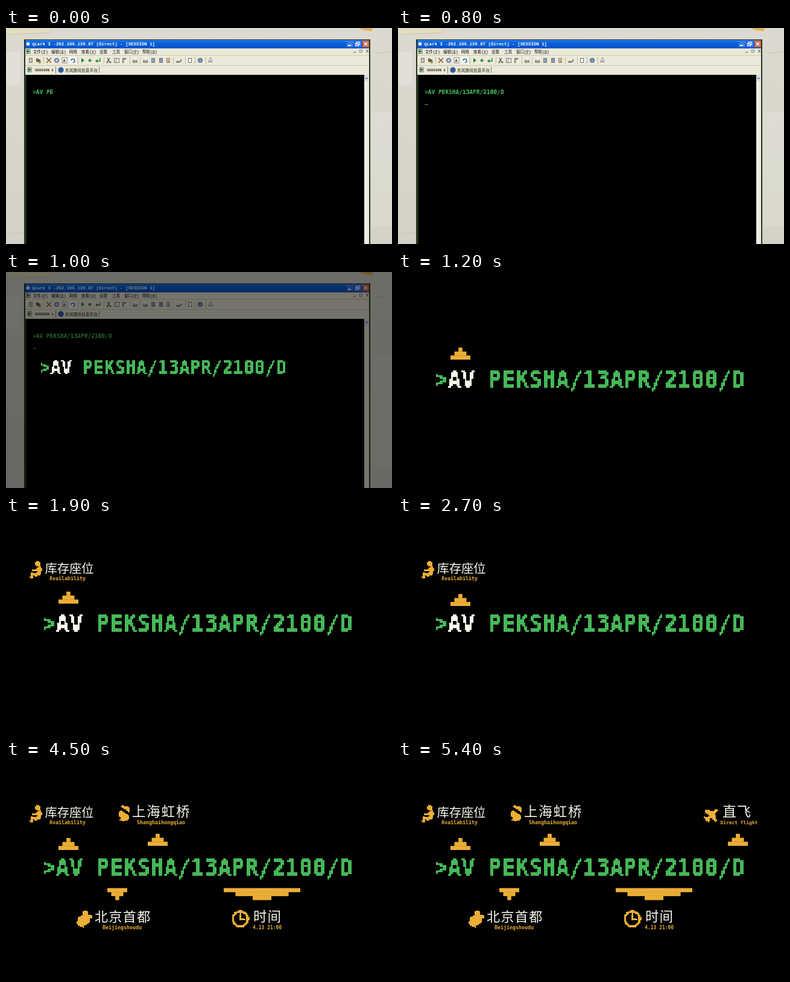
An HTML page with a canvas for the animation above (5500 ms loop, 640 by 360 pixels).

```html
<!DOCTYPE html>
<html lang="zh">
<head>
<meta charset="utf-8">
<title>AV command</title>
<style>
html, body { margin: 0; width: 100%; height: 100%; overflow: hidden; background: #000; }
canvas { display: block; width: 100vw; height: 100vh; }
</style>
</head>
<body>
<canvas id="stage" width="640" height="360"></canvas>
<script>
const ctx = document.getElementById('stage').getContext('2d');
const LOOP = 5500, STEP = 100;
const GREEN = '#46b858', WHITE = '#f8f6ea', ORANGE = '#ebae36', CREAM = '#ece9d8';
const CJK = '"Noto Sans CJK SC", "Noto Sans CJK", sans-serif';
const MONO = '"DejaVu Sans Mono", monospace';
const THIN = '"Liberation Mono", "Noto Sans CJK SC", monospace';
const COMMAND = '>AV PEKSHA/13APR/2100/D';

const clamp = v => Math.max(0, Math.min(1, v));
const mix = (a, b, p) => a + (b - a) * p;

function rect(x, y, w, h, color, c = ctx) {
  c.fillStyle = color;
  c.fillRect(x, y, w, h);
}
function dot(x, y, r, color, c = ctx) {
  c.fillStyle = color;
  c.beginPath();
  c.arc(x, y, r, 0, Math.PI * 2);
  c.fill();
}
function path(points, c = ctx) {
  c.beginPath();
  points.forEach(([x, y]) => c.lineTo(x, y));
}
function shape(points, color, c = ctx) {
  path(points, c);
  c.fillStyle = color;
  c.fill();
}
function line(points, color, width = 1, c = ctx) {
  path(points, c);
  c.strokeStyle = color;
  c.lineWidth = width;
  c.stroke();
}
function text(str, x, y, font, color, spacing = 0) {
  ctx.font = font;
  ctx.fillStyle = color;
  ctx.letterSpacing = spacing + 'px';
  ctx.fillText(str, x, y);
  ctx.letterSpacing = '0px';
}

// Paints on a coarse grid and makes every cell fully on or off.
function pixelate(w, h, paint) {
  const tile = document.createElement('canvas');
  tile.width = w;
  tile.height = h;
  const c = tile.getContext('2d');
  paint(c);
  const image = c.getImageData(0, 0, w, h), d = image.data;
  for (let i = 3; i < d.length; i += 4) d[i] = d[i] > 115 ? 255 : 0;
  c.putImageData(image, 0, 0);
  return tile;
}
function pixelText(str, color) {
  return pixelate(str.length * 8, 16, c => {
    c.font = 'bold 13.3px ' + MONO;
    c.fillStyle = color;
    [...str].forEach((ch, i) => c.fillText(ch, i * 8, 12));
  });
}
function icon(x, y, w, h, paint) {
  const cell = 1.7, cols = Math.ceil(w / cell), rows = Math.ceil(h / cell);
  const tile = pixelate(cols, rows, c => {
    c.scale(1 / cell, 1 / cell);
    paint(c);
  });
  return { tile, x, y, w: cols * cell, h: rows * cell };
}

const greenText = pixelText(COMMAND, GREEN);
const whiteAV = pixelText(' AV', WHITE);

const seat = icon(38, 75, 23, 31, c => {
  dot(15, 4.5, 4.3, ORANGE, c);
  shape([[13, 10], [20, 9], [22, 14], [19, 24], [9, 25], [9, 21], [14, 19]], ORANGE, c);
  line([[15, 11], [12, 16], [5, 16]], ORANGE, 3, c);
  line([[12, 23], [5, 21], [5, 27], [1, 28]], ORANGE, 4, c);
});
const beijing = icon(117, 249, 28, 31, c => shape([
  [13, 1], [18, 3], [18, 8], [26, 10], [26, 14], [21, 17], [23, 22], [15, 25],
  [11, 30], [2, 27], [0, 22], [3, 19], [1, 15], [7, 11], [10, 10], [10, 5]], ORANGE, c));
const shanghai = icon(185, 75, 22, 29, c => {
  shape([[1, 14], [6, 9], [10, 12], [18, 17], [19, 24], [13, 26], [9, 28], [4, 25], [5, 20], [1, 19]], ORANGE, c);
  line([[6, 1], [12, 4], [20, 11]], ORANGE, 4, c);
  line([[14, 2], [20, 7]], ORANGE, 2, c);
});
const clock = icon(373, 250, 31, 31, c => {
  c.strokeStyle = ORANGE;
  c.lineWidth = 3.8;
  c.beginPath();
  c.arc(15.5, 15, 12.6, 0, Math.PI * 2);
  c.stroke();
  line([[15.5, 6], [15.5, 16], [23, 16]], ORANGE, 3.2, c);
});
const plane = icon(507, 80, 24, 25, c => {
  line([[4, 21], [22, 3]], ORANGE, 5, c);
  shape([[1, 5], [4, 3], [17, 6], [10, 14]], ORANGE, c);
  shape([[20, 24], [22, 21], [18, 8], [11, 15]], ORANGE, c);
  shape([[0, 14], [10, 16], [9, 24], [7, 24], [5, 19], [0, 17]], ORANGE, c);
});

const labels = [
  { at: 1200, wait: 200, arrow: [103.5, 130, 1], icon: seat,
    title: ['库存座位', 64.5, 95, 20.5, -.3], note: ['Availability', 72, 107] },
  { at: 3300, wait: 100, arrow: [184.5, 213.5, -1], icon: beijing,
    title: ['北京首都', 147, 269, 22, 1.4], note: ['Beijingshoudu', 160, 281.5] },
  { at: 3900, wait: 100, arrow: [251.5, 123, 1], icon: shanghai,
    title: ['上海虹桥', 209, 94, 22.5, 1.8], note: ['Shanghaihongqiao', 217, 107] },
  { at: 4300, wait: 100, arrow: [424.5, 213.5, -1, [63.5, 44, 15.5]], icon: clock,
    title: ['时间', 410, 269, 22.5, 1], note: ['4.13 21:00', 409, 281.5, 8] },
  { at: 4700, wait: 100, arrow: [563.5, 123, 1], icon: plane,
    title: ['直飞', 538, 94, 23, 1], note: ['Direct flight', 534.5, 107, 7.9] }
];

function drawArrow([cx, y, up, halves = [16.5, 10, 3.3]], lift) {
  halves.forEach((half, i) => {
    const row = up > 0 ? 2 - i : i;
    rect(cx - half, y + lift + row * 6.6, half * 2, 6.8, ORANGE);
  });
}

function drawLabel(label, t) {
  if (t < label.at) return;
  const bobbing = label === labels[0] && t < 2700;
  const lift = bobbing && Math.floor((t - label.at) / 300) % 2 === 0 ? -4 : 0;
  drawArrow(label.arrow, lift);
  ctx.globalAlpha = clamp((t - label.at - label.wait + 100) / 200);
  const { tile, x, y, w, h } = label.icon;
  ctx.imageSmoothingEnabled = false;
  ctx.drawImage(tile, x, y, w, h);
  const [title, tx, ty, size, gap] = label.title;
  text(title, tx, ty, `500 ${size}px ${CJK}`, WHITE, gap);
  const [note, nx, ny, noteSize = 8.3] = label.note;
  text(note, nx, ny, `bold ${noteSize}px ${MONO}`, ORANGE);
  ctx.globalAlpha = 1;
}

function drawCommand(x, baseline, scale, count, highlight) {
  const sy = scale * 1.04;
  const put = (tile, w) => ctx.drawImage(tile, 0, 0, w, 16, x, baseline - 12 * sy, w * scale, 16 * sy);
  ctx.imageSmoothingEnabled = scale < 1;
  put(greenText, count * 8);
  if (highlight) {
    rect(x + 8 * scale, baseline - 12 * sy, 16 * scale, 16 * sy, '#000');
    put(whiteAV, 24);
  }
}

function drawWall() {
  const wall = ctx.createLinearGradient(0, 0, 0, 360);
  wall.addColorStop(0, '#dcdad0');
  wall.addColorStop(1, '#d3d2c6');
  rect(0, 0, 640, 360, wall);
  shape([[0, 0], [75, 0], [73, 8], [0, 11]], '#e3dcc0');
  line([[0, 11], [73, 8], [75, 0]], '#c9c4ae');
  rect(0, 40, 24, 55, 'rgba(255,255,250,.16)');
  rect(606, 140, 34, 190, 'rgba(255,255,250,.13)');
  line([[0, 343], [28, 341]], '#c6c5b9');
  line([[614, 42], [640, 40]], '#c8c7bb');
  shape([[586, 0], [609, 0], [606, 6], [590, 3]], '#e0b761');
}

function drawTitleBar() {
  rect(30, 19, 574, 341, '#26321a');
  const blue = ctx.createLinearGradient(0, 20, 0, 34);
  blue.addColorStop(0, '#2484f2');
  blue.addColorStop(.3, '#0961dc');
  blue.addColorStop(1, '#0753cb');
  rect(32, 20, 570, 14, blue);
  dot(36.5, 26.5, 3, '#dce9ff');
  text('qLark 3 -202.106.139.87 (Direct) - [SESSION 1]', 43, 29, 'bold 7.4px ' + THIN, '#fff');
  rect(565, 21, 11, 11, '#3979e8');
  rect(567, 28, 5, 2, '#fff');
  rect(578, 21, 11, 11, '#3979e8');
  ctx.strokeStyle = '#fff';
  ctx.lineWidth = 1;
  ctx.strokeRect(581.5, 23.5, 5, 4);
  ctx.strokeRect(579.5, 25.5, 5, 4);
  rect(591, 21, 11, 11, '#dc673c');
  line([[594, 24], [599, 29]], '#fff', 1.4);
  line([[599, 24], [594, 29]], '#fff', 1.4);
}

function drawSessionIcon(x, y) {
  rect(x - 3.5, y - 4, 7, 8, '#566f58');
  rect(x - 2.5, y - 3, 5, 6, '#e9f2e2');
  shape([[x - 2, y - 3], [x + 3, y], [x - 2, y + 3]], '#24713a');
}

function drawMenu() {
  rect(32, 34, 570, 44, CREAM);
  drawSessionIcon(37, 39);
  const items = { '文件(F)': 45, '编辑(E)': 75, '网络': 105, '查看(V)': 125,
    '设置': 155, '工具': 176, '窗口(P)': 196, '帮助(H)': 226 };
  for (const [item, x] of Object.entries(items)) {
    text(item, x, 41.5, '500 6.5px ' + THIN, '#111');
    if (item.length > 2) rect(x + 16.5, 42, 4, .7, '#333');
  }
  rect(576, 40, 4, 1, '#555');
  ctx.strokeStyle = '#666';
  ctx.lineWidth = .8;
  ctx.strokeRect(586.5, 36.5, 4, 4);
  line([[597, 36], [601, 41]], '#555');
  line([[601, 36], [597, 41]], '#555');
  rect(32, 45, 570, 1, '#cbc8b7');
}

function drawPage(x, color) {
  rect(x - 3, 50, 6, 8, '#777');
  rect(x - 2, 51, 4, 6, color);
}
function drawPrinter(x) {
  rect(x - 2, 50, 5, 4, '#f8f8f4');
  rect(x - 4, 53, 8, 5, '#8c8d88');
  rect(x - 3, 54, 6, 1, '#ddd');
}
function drawToolbar() {
  [62, 119, 162, 205, 222, 277, 297, 313, 331].forEach(x => rect(x, 48, 1, 12, '#bdbaaa'));
  drawPage(41, '#c5c4bd');
  shape([[50, 50], [57, 53], [57, 58], [50, 56]], '#655f4f');
  dot(56, 57, 2, '#a8803e');
  line([[67, 50], [75, 58]], '#bd7b29', 2);
  line([[75, 50], [67, 58]], '#626258', 1.6);
  dot(84, 54, 4, '#6383a4');
  dot(84, 54, 2, '#cad5df');
  rect(92.5, 49, 9, 10, '#9b9b91');
  rect(93.5, 50, 7, 8, '#f5f4eb');
  text('A', 94.5, 57, 'bold 7px ' + THIN, '#333');
  rect(105, 48, 12, 12, '#f8f7ef');
  ctx.strokeStyle = '#3267ad';
  ctx.lineWidth = 1.6;
  ctx.beginPath();
  ctx.arc(111, 54.5, 3, Math.PI, Math.PI * 2.5);
  ctx.stroke();
  shape([[125, 50], [130, 54], [125, 58]], '#29873c');
  shape([[139, 51], [142, 54], [139, 57], [136, 54]], '#29983c');
  line([[156, 50], [156, 55], [150, 55]], '#29873c', 1.5);
  shape([[148, 55], [152, 52], [152, 58]], '#29873c');
  line([[168, 50], [172, 57]], '#555', 1.3);
  line([[172, 50], [168, 57]], '#555', 1.3);
  dot(168, 57, 1.5, '#666');
  dot(173, 57, 1.5, '#666');
  drawPage(182, '#f3f3ed');
  drawPage(185, '#f8f8f2');
  drawPage(196, '#b5a681');
  rect(196, 53, 5, 5, '#eeeeea');
  drawPrinter(214);
  drawPrinter(231);
  drawPage(244, '#82a4c7');
  drawPage(257, '#8196b6');
  drawPage(269, '#f5efd8');
  rect(268, 52, 2, 5, '#ca8239');
  shape([[282, 55], [288, 55], [291, 51], [291, 56], [287, 58], [282, 58]], '#878a85');
  drawPage(305, '#f7f6ef');
  dot(322, 54, 4, '#5a7698');
  text('?', 320, 57, 'bold 6px ' + THIN, '#fff');
  line([[339, 49], [342, 55], [336, 55], [339, 49]], '#8793a0');
  rect(335, 56, 8, 1, '#7c8896');
  rect(32, 62, 570, 1, '#c5c2b2');
}

function drawWindow(t) {
  drawWall();
  drawTitleBar();
  drawMenu();
  drawToolbar();
  drawSessionIcon(39, 69.5);
  text('SESSION 1', 48, 72, 'bold 5.7px ' + THIN, '#222');
  rect(82, 64, 1, 12, '#77766d');
  dot(91, 70, 4.7, '#315d9e');
  text('东岚旅讯信息平台', 98, 72.5, '500 6.75px ' + CJK, '#111');
  rect(154, 65, 1, 10, '#77766d');
  rect(34, 78, 560, 282, '#000');
  rect(594, 78, 8, 282, '#eeede4');
  rect(594.5, 79, 7, 10, '#d9dceb');
  line([[596, 85], [598, 83], [600, 85]], '#65728c', 1.2);
  const typed = Math.min(COMMAND.length, 6 + Math.floor(t * 3 / 100));
  drawCommand(44, 110, .715, typed, false);
  if (t >= 700) rect(44.5, 127, 5.5, 1, GREEN);
}

function draw(t) {
  if (t < 1200) drawWindow(t);
  if (t > 800) {
    const u = clamp((t - 800) / 400), p = 1 - (1 - u) ** 1.86;
    rect(0, 0, 640, 360, `rgba(0,0,0,${u})`);
    drawCommand(mix(44, 60.1, p), mix(110, 192.8, p), mix(.715, 2.8, p), COMMAND.length, t < 3300);
  }
  labels.forEach(label => drawLabel(label, t));
}

function tick() {
  const t = performance.now() % LOOP;
  draw(Math.floor(t / STEP) * STEP);
  requestAnimationFrame(tick);
}
tick();
</script>
</body>
</html>
```
